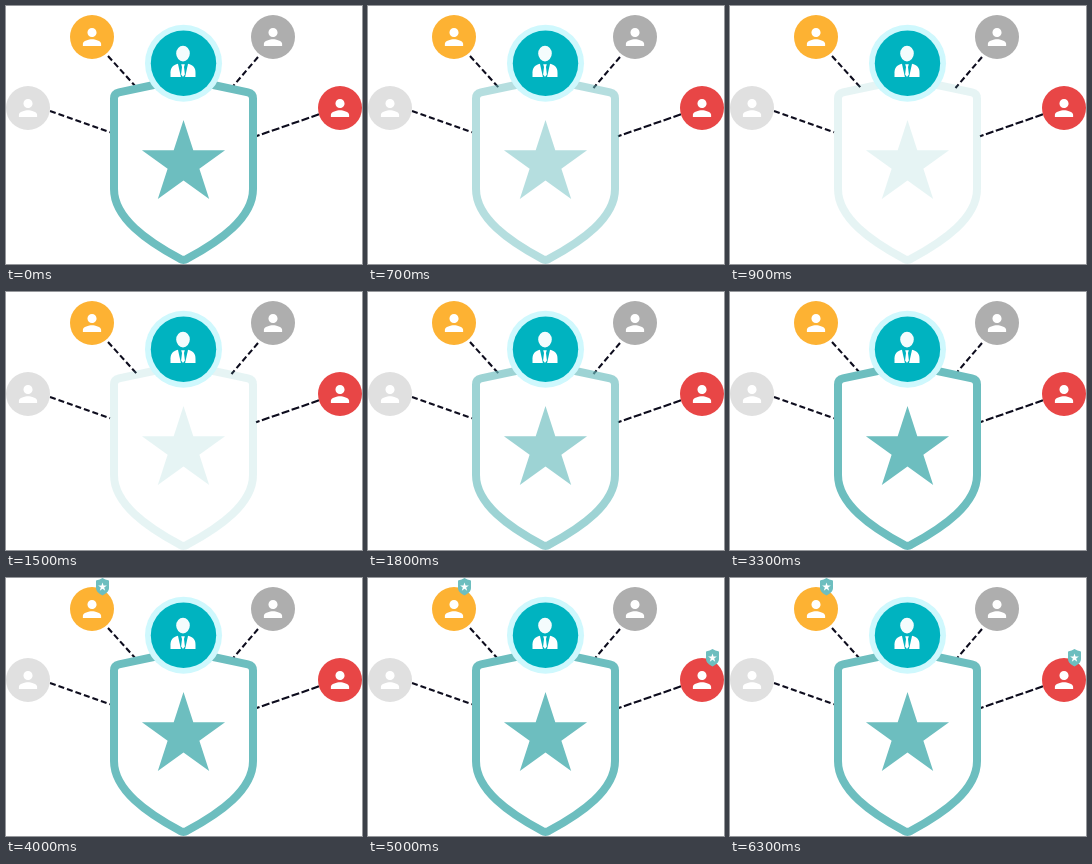
Recreate the animation shown at these times as an HTML page with a canvas. Size 356 by 258 pixels, loop 6.8 s.

```html
<!DOCTYPE html>
<html lang="en">
<head>
<meta charset="utf-8">
<title>Shield and members</title>
<style>
html, body { margin: 0; width: 100%; height: 100%; overflow: hidden; background: #fff; }
canvas { display: block; width: 356px; height: 258px; }
</style>
</head>
<body>
<canvas id="stage" width="356" height="258"></canvas>
<script>
const ctx = document.getElementById('stage').getContext('2d');
const LOOP = 6800;
const STEP = 100;
const TEAL = '#6dbebf';

const person = new Path2D('M0 0c2.21 0 4-1.79 4-4s-1.79-4-4-4-4 1.79-4 4 1.79 4 4 4zm0 2c-2.67 0-8 1.34-8 4v2h16v-2c0-2.66-5.33-4-8-4z');
const shield = new Path2D('M177.5 71Q163 76 150 78.5L113 86.4Q108 87.5 108 92.5V183C108 212 141 235 174 252.8Q177.5 255 181 252.8C214 235 247 212 247 183V92.5Q247 87.5 242 86.4L205 78.5Q192 76 177.5 71Z');
const badge = new Path2D('M6.5 0Q9.5 2 12.3 2.3Q13 2.4 13 3.2V10C13 13.4 10 15.7 6.5 17.6C3 15.7 0 13.4 0 10V3.2Q0 2.4 .7 2.3Q3.5 2 6.5 0Z');
const suit = new Path2D('M164.5 71V66.5C164.5 61.5 167 59.3 172 57.8H182C187 59.3 189.5 61.5 189.5 66.5V71Z');
const collar = new Path2D('M171.8 57L174.9 71H179.1L182.2 57Z');
const tie = new Path2D('M175.2 58.3H178.8L178 61L178.9 68.5L177 71L175.1 68.5L176 61Z');

const members = [
  [22, 102, '#e0e0e0'],
  [86, 31, '#fdb233'],
  [267, 31, '#aeaeae'],
  [334, 102, '#e84646']
];

const links = [
  [44, 105, 104, 126.3, 6, 3],
  [102, 50, 131, 82, 6, 3],
  [252, 51, 225.5, 82, 6, 3],
  [313, 108.3, 250, 130.3, 8, 2.5]
];

function disc(x, y, r, color) {
  ctx.fillStyle = color;
  ctx.beginPath();
  ctx.arc(x, y, r, 0, Math.PI * 2);
  ctx.fill();
}

function star(x, y, r, color) {
  ctx.fillStyle = color;
  ctx.beginPath();
  for (let i = 0; i < 10; i++) {
    const a = i * Math.PI / 5;
    const d = i % 2 ? r * 0.382 : r;
    ctx.lineTo(x + d * Math.sin(a), y - d * Math.cos(a));
  }
  ctx.fill();
}

function drawLinks() {
  ctx.strokeStyle = '#0d0c1d';
  ctx.lineWidth = 2.1;
  for (const [x1, y1, x2, y2, on, off] of links) {
    ctx.setLineDash([on, off]);
    ctx.beginPath();
    ctx.moveTo(x1, y1);
    ctx.lineTo(x2, y2);
    ctx.stroke();
  }
  ctx.setLineDash([]);
}

function drawShield(alpha) {
  ctx.globalAlpha = alpha;
  ctx.strokeStyle = TEAL;
  ctx.lineWidth = 8;
  ctx.stroke(shield);
  star(177.5, 157.7, 43.7, TEAL);
  ctx.globalAlpha = 1;
}

function drawMember([x, y, color]) {
  disc(x, y, 22, color);
  ctx.save();
  ctx.translate(x, y);
  ctx.scale(1.14, 1.14);
  ctx.fillStyle = '#fff';
  ctx.fill(person);
  ctx.restore();
}

function drawLeader() {
  disc(177.5, 57.3, 38.5, '#cff8fd');
  disc(177.5, 57.3, 32.7, '#00b3c0');
  ctx.fillStyle = '#f4fcfd';
  ctx.beginPath();
  ctx.ellipse(177, 47.6, 6.8, 7.8, 0, 0, Math.PI * 2);
  ctx.fill();
  ctx.fillStyle = '#fff';
  ctx.fill(suit);
  ctx.fillStyle = '#00b3c0';
  ctx.fill(collar);
  ctx.fillStyle = '#fff';
  ctx.fill(tie);
}

function drawBadge(x, y, alpha) {
  ctx.save();
  ctx.globalAlpha = alpha;
  ctx.translate(x, y);
  ctx.fillStyle = TEAL;
  ctx.fill(badge);
  star(6.5, 9, 4.6, '#fff');
  ctx.restore();
}

// Stepped rise from 0 to 1, with the first step at the start time.
function ramp(t, start, steps) {
  const n = Math.floor((t - start) / STEP) + 1;
  return Math.min(Math.max(n / steps, 0), 1);
}

function draw(t) {
  ctx.fillStyle = '#fff';
  ctx.fillRect(0, 0, 356, 258);
  drawLinks();
  drawShield(1 - ramp(t, 500, 6) + ramp(t, 1500, 6));
  members.forEach(drawMember);
  drawLeader();
  drawBadge(90, 0, t < 3300 ? ramp(t, 2500, 4) : ramp(t, 3700, 4));
  drawBadge(338, 71, ramp(t, 4500, 6) - ramp(t, 5500, 4) + ramp(t, 6000, 4));
}

const begin = performance.now();
function tick() {
  draw((performance.now() - begin) % LOOP);
  requestAnimationFrame(tick);
}
tick();
</script>
</body>
</html>
```
